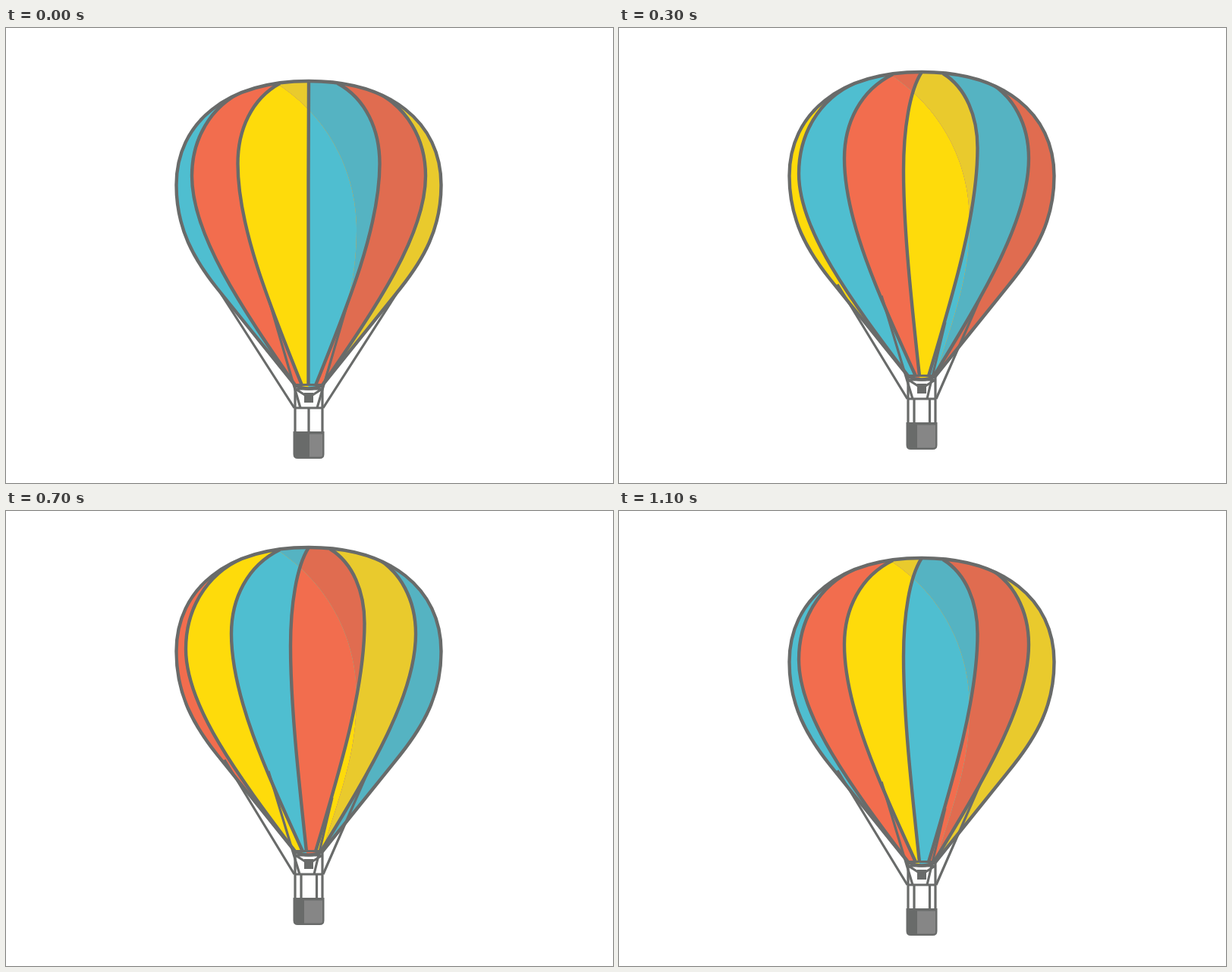
These frames come from a looping animation (800 px wide and 600 px high, 1200 ms). An HTML page:

```html
<!DOCTYPE html>
<html lang="en">
<head>
<meta charset="utf-8">
<title>Hot air balloon</title>
<style>
  html, body { margin: 0; width: 100%; height: 100%; overflow: hidden; background: #fff; }
  svg { display: block; width: 100vw; height: 100vh; }
  .line { fill: none; stroke: #696b6a; stroke-width: 4.4; stroke-linejoin: round; }
  .rope { fill: none; stroke: #696b6a; stroke-width: 3.2; }
  .dark { fill: #696b6a; }
</style>
</head>
<body>
<svg viewBox="0 0 800 600">
  <defs>
    <path id="hull" d="M0 70C-107 70-174.5 124-174.5 207C-174.5 265-151 305-121 343L-18 471Q0 480 18 471L121 343C151 305 174.5 265 174.5 207C174.5 124 107 70 0 70Z"/>
    <clipPath id="hullClip"><use href="#hull"/></clipPath>
    <clipPath id="shadeClip">
      <path d="M-47 70C26 115 63 190 63 265C63 330 51 370 19 467V490H200V40H-47Z"/>
    </clipPath>
  </defs>
  <g id="balloon">
    <g clip-path="url(#hullClip)">
      <g id="lit"></g>
      <g id="shaded" clip-path="url(#shadeClip)"></g>
      <path id="seams" class="line"/>
    </g>
    <use href="#hull" class="line"/>
    <path id="ropes" class="rope"/>
    <path class="rope" d="M-18 470.5H18M-18 476H18M-16 477L-5 484H5L16 477M-18 470V535M18 470V535M-19 501H19"/>
    <rect class="dark" x="-6" y="481" width="12" height="13"/>
    <path class="dark" d="M-20.5 532H20.5V562Q20.5 568 14.5 568H-14.5Q-20.5 568-20.5 562Z"/>
    <path id="side" fill="#868686"/>
  </g>
</svg>
<script>
const STEP = 100, STEPS = 12;
const LIFT = [0, 4, 8, 12, 17, 22, 26, 22, 18, 14, 11, 8];
const LIT = ['#4fbed0', '#f26d4e', '#fedb0b'];
const SHADED = ['#55b3c2', '#e06c50', '#e9ca2d'];
const BOTTOM = 471;
const $ = id => document.getElementById(id);

const mirrorSeam = ([top, topY, wide, wideY, end]) => [-top, topY, -wide, wideY, -end];
const mirrorRope = ([x, y, end]) => [-x, y, -end];
const both = (list, mirror) => [...list, ...list.map(mirror).reverse()];

// Seam: top x, top y, widest x, widest y, bottom x. Rope: x, y, end x.
const front = {
  seams: [...both([[-84, 82, -154, 195, -18], [-38, 73, -93.5, 179, -9]], mirrorSeam)],
  ropes: both([[-116, 350, -19], [-52, 360, -11]], mirrorRope),
  posts: [0], edge: 1
};
front.seams.splice(2, 0, [0, 70, -0.5, 200, -0.5]);

const between = {
  seams: both([[-70, 80, -134, 195, -13], [-8, 72, -57.5, 171, -7]], mirrorSeam),
  ropes: both([[-79, 383, -19], [-61, 392, -9]], mirrorRope),
  posts: [], edge: 18
};

const before = {
  seams: [
    [-87, 84, -162, 204, -18], [-38, 73, -102, 184, -8], [0, 70, -24, 200, -3],
    [28, 72, 73.5, 170, 9], [84, 81, 141, 184, 16]
  ],
  ropes: [[-111, 350, -19], [-53, 365, -12], [31, 400, 7], [77, 368, 19]],
  posts: [-10, 10.5], edge: -6
};

const after = {
  seams: before.seams.map(mirrorSeam).reverse(),
  ropes: before.ropes.map(mirrorRope),
  posts: [-10.5, 10], edge: 9.5
};
const POSES = [front, after, between, before];

function seamPath([top, topY, wide, wideY, end]) {
  const rise = wideY - topY, drop = BOTTOM - wideY;
  return `M${top} ${topY}C${top + 0.67 * (wide - top)} ${topY + 0.19 * rise} ` +
    `${wide} ${wideY - 0.42 * rise} ${wide} ${wideY}` +
    `C${wide} ${wideY + 0.28 * drop} ${wide + 0.47 * (end - wide)} ${wideY + 0.62 * drop} ${end} ${BOTTOM}`;
}

// Each gore covers everything to the right of its seam.
function gores(seams, first, colors) {
  const fill = i => colors[(first + i) % 3];
  return `<path fill="${fill(0)}" d="M-200 40H200V490H-200Z"/>` + seams.map((seam, i) =>
    `<path fill="${fill(i + 1)}" d="${seamPath(seam)}V490H200V40H${seam[0]}Z"/>`).join('');
}

function draw(step) {
  const pose = POSES[step % 4];
  const first = (3 - Math.floor((step + 1) / 4) % 3) % 3;
  $('balloon').setAttribute('transform', `translate(399 ${-LIFT[step]})`);
  $('lit').innerHTML = gores(pose.seams, first, LIT);
  $('shaded').innerHTML = gores(pose.seams, first, SHADED);
  $('seams').setAttribute('d', pose.seams.map(seamPath).join(''));
  $('ropes').setAttribute('d',
    pose.ropes.map(([x, y, end]) => `M${x} ${y}L${end} 501`).join('') +
    pose.posts.map(x => `M${x} 501V535`).join(''));
  $('side').setAttribute('d', pose.edge < 18
    ? `M${pose.edge} 535.5H18V563Q18 565.5 15.5 565.5H${pose.edge}Z` : '');
}

let shown = -1;
const start = performance.now();
function tick() {
  const step = Math.floor((performance.now() - start) / STEP) % STEPS;
  if (step !== shown) draw(shown = step);
  requestAnimationFrame(tick);
}
tick();
</script>
</body>
</html>
```
